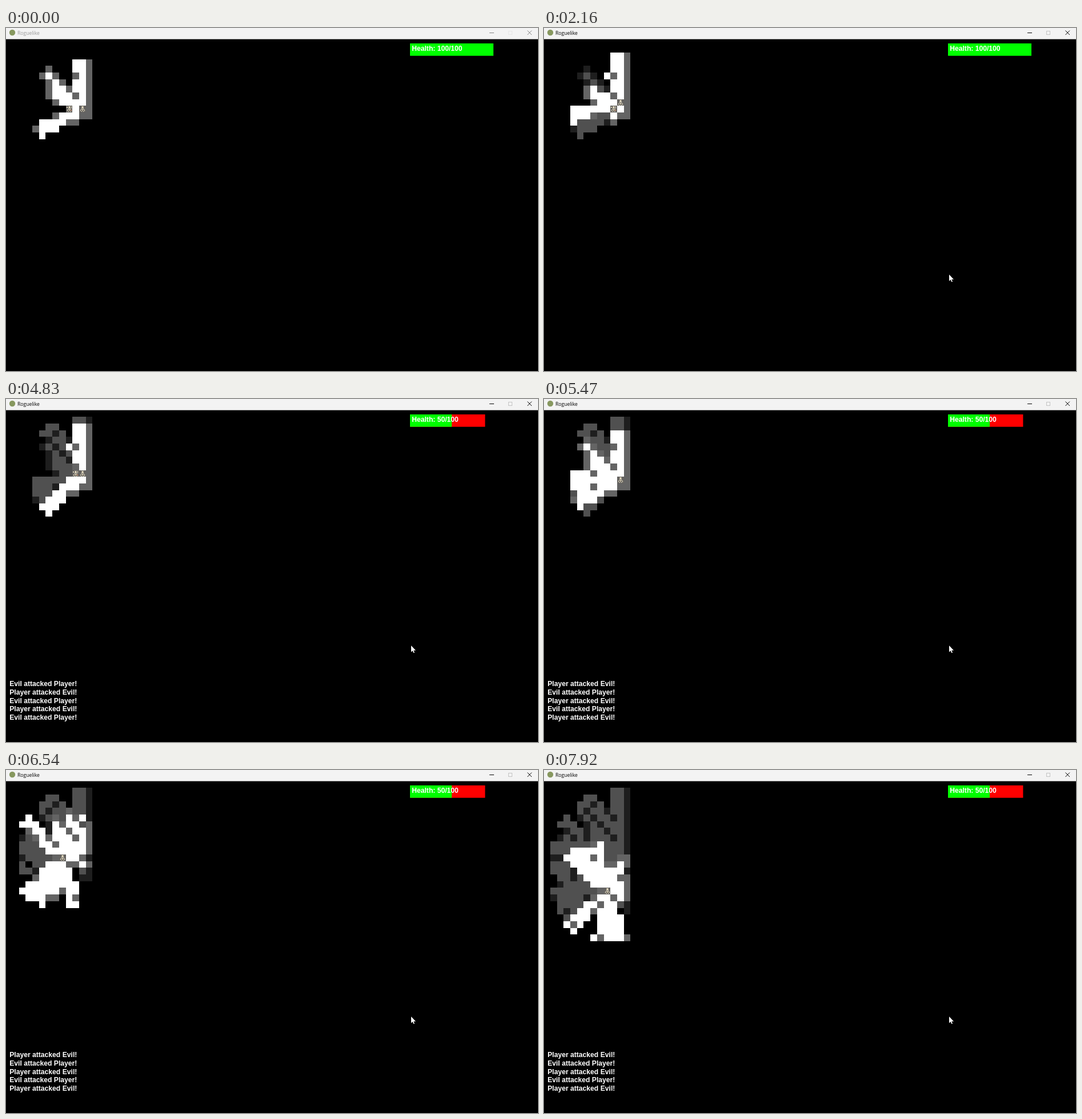
Animation, 931 px wide and 601 px high, one loop 8000 ms. Source, as an HTML page with a canvas:

```html
<!DOCTYPE html>
<html lang="en">
<head>
<meta charset="utf-8">
<title>Roguelike</title>
<style>
  html, body { margin: 0; width: 100%; height: 100%; overflow: hidden; background: #000; }
  canvas { display: block; width: 931px; height: 601px; }
</style>
</head>
<body>
<canvas id="stage" width="931" height="601"></canvas>
<script>
const ctx = document.getElementById('stage').getContext('2d');
const LOOP = 8000;
const RADIUS = 8;

// Dungeon rows: # wall, . floor
const MAP = [
  '',
  '          ..#',
  '      ..  ..#',
  '     ..#. ..#',
  '     .#..#..#',
  '   . #.#..#.#',
  '  ... #.#...#',
  '   #..#..#..#',
  '  #.#.#...#.#',
  ' ......#....#',
  ' ...........#',
  ' ##....#...##',
  ' ........##.#',
  ' ...#.......#',
  '  ..#......##',
  '  #.........#',
  ' .......#...#',
  ' #....##..#.#',
  '  ......#...#',
  '  .#...#... #',
  '   .... ....',
  '   .#.  ....',
  '    .   ....',
  '       .#...#',
];

// Each turn: start time, player cell, and whatever else changes
const TURNS = [
  { at: 0, player: [11, 10], evil: [9, 10], health: 100, log: '' },
  { at: 2160, player: [11, 9], evil: [10, 10] },
  { at: 2560, player: [11, 8], evil: [10, 9] },
  { at: 3330, player: [11, 9], health: 90, log: 'E' },
  { at: 3800, health: 80, log: 'EPE' },
  { at: 4230, health: 70, log: 'EPEPE' },
  { at: 4530, health: 60 },
  { at: 4830, health: 50 },
  { at: 5130, evil: null, log: 'PEPEP' },
  { at: 5470, player: [11, 10] },
  { at: 5670, player: [10, 10] },
  { at: 5970, player: [9, 10] },
  { at: 6180, player: [9, 11] },
  { at: 6540, player: [8, 11] },
  { at: 6750, player: [8, 12] },
  { at: 6980, player: [8, 13] },
  { at: 7250, player: [8, 14] },
  { at: 7450, player: [9, 14] },
  { at: 7720, player: [9, 15] },
  { at: 7920, player: [9, 16] },
];
const MESSAGES = { E: 'Evil attacked Player!', P: 'Player attacked Evil!' };

const tile = (x, y) => (MAP[y] || '')[x] || ' ';
const key = (x, y) => x + ',' + y;

// Recursive shadowcasting over eight octants
function fieldOfView([px, py], evil) {
  const lit = new Set([key(px, py)]);
  const blocks = (x, y) => tile(x, y) !== '.' || (evil && evil[0] === x && evil[1] === y);

  function cast(row, start, end, place) {
    if (start < end) return;
    let nextStart = start;
    for (let j = row; j <= RADIUS; j++) {
      let blocked = false;
      for (let dx = -j; dx <= 0; dx++) {
        const dy = -j;
        const left = (dx - 0.5) / (dy + 0.5);
        const right = (dx + 0.5) / (dy - 0.5);
        if (start < right) continue;
        if (end > left) break;
        const [x, y] = place(dx, dy);
        if (dx * dx + dy * dy < RADIUS * RADIUS) lit.add(key(x, y));
        const solid = blocks(x, y);
        if (blocked) {
          if (solid) { nextStart = right; continue; }
          blocked = false;
          start = nextStart;
        } else if (solid && j < RADIUS) {
          blocked = true;
          cast(j + 1, start, left, place);
          nextStart = right;
        }
      }
      if (blocked) break;
    }
  }

  for (const sx of [1, -1]) for (const sy of [1, -1]) {
    cast(1, 1, 0, (dx, dy) => [px + sx * dx, py + sy * dy]);
    cast(1, 1, 0, (dx, dy) => [px + sx * dy, py + sy * dx]);
  }
  return lit;
}

// Carry unchanged fields forward and accumulate the explored cells
let previous = { explored: new Set() };
const states = TURNS.map(turn => {
  const state = { ...previous, ...turn };
  state.lit = fieldOfView(state.player, state.evil);
  state.explored = new Set([...previous.explored, ...state.lit]);
  return previous = state;
});

const edgeX = c => Math.round(c * 11.68 - 0.6);
const edgeY = r => Math.round(r * 11.68 + 19.6);

function rect(color, x, y, w, h) {
  ctx.fillStyle = color;
  ctx.fillRect(x, y, w, h);
}

function text(str, x, y, font, color) {
  ctx.font = font;
  ctx.fillStyle = color;
  ctx.fillText(str, x, y);
}

function line(color, ...points) {
  ctx.strokeStyle = color;
  ctx.lineWidth = 1;
  ctx.beginPath();
  for (let i = 0; i < points.length; i += 4) {
    ctx.moveTo(points[i], points[i + 1]);
    ctx.lineTo(points[i + 2], points[i + 3]);
  }
  ctx.stroke();
}

function drawCells({ lit, explored }) {
  MAP.forEach((row, y) => [...row].forEach((kind, x) => {
    const k = key(x, y);
    if (kind === ' ' || !explored.has(k)) return;
    const wall = kind === '#';
    const color = lit.has(k) ? (wall ? '#646464' : '#fff') : (wall ? '#1e1e1e' : '#505050');
    rect(color, edgeX(x), edgeY(y), edgeX(x + 1) - edgeX(x), edgeY(y + 1) - edgeY(y));
  }));
}

function drawCreature([cx, cy], evil) {
  const x = edgeX(cx), y = edgeY(cy);
  const bone = '#ddd5bd', dark = '#45403a';
  rect('#656360', x, y, edgeX(cx + 1) - x, edgeY(cy + 1) - y);
  rect(bone, x + 4, y + 1, 4, 4);
  rect(dark, x + 4, y + 2, 1, 1);
  rect(dark, x + 7, y + 2, 1, 1);
  rect(bone, x + 3, y + 6, 6, 1);
  rect(bone, x + 2, y + 7, 1, 3);
  rect(bone, x + 9, y + 7, 1, 3);
  rect('#b9ae94', x + 5, y + 7, 2, 2);
  rect(bone, x + 4, y + 9, 1, 2);
  rect(bone, x + 7, y + 9, 1, 2);
  if (evil) {
    rect(bone, x + 1, y + 2, 2, 2);
    rect(bone, x + 9, y + 1, 1, 4);
    rect('#a86f58', x + 8, y + 7, 2, 2);
  }
}

function drawTitleBar(active) {
  const ink = active ? '#000' : '#858585';
  rect('#f3f3f3', 0, 0, 931, 19.6);
  ctx.fillStyle = '#87985f';
  ctx.beginPath();
  ctx.arc(11, 8, 5.2, 0, 7);
  ctx.fill();
  text('Roguelike', 20, 11.7, '8.6px "Open Sans", sans-serif', active ? '#000' : '#999');
  line(ink, 846, 8.5, 854, 8.5);
  ctx.strokeStyle = active ? '#c4c4c4' : '#e6e6e6';
  ctx.strokeRect(879.5, 5.5, 6, 6);
  line(ink, 912.5, 4.5, 920, 12, 920, 4.5, 912.5, 12);
}

function drawHud({ health, log }) {
  const bold = '12.15px "Liberation Sans", Arial, sans-serif';
  const width = 146;
  if (health < 90) rect('#f00', 707, 27, width * 0.9, 21.7);
  rect('#0f0', 707, 27, width * health / 100, 21.7);
  text(`Health: ${health}/100`, 710.2, 40.4, 'bold ' + bold, '#fff');
  [...log].forEach((who, i) => text(MESSAGES[who], 6.2, 503.3 + i * 14.65, 'bold ' + bold, '#fff'));
}

function drawPointer(t) {
  if (t < 90) return;
  const p = Math.min(1, (t - 90) / 490);
  const away = (1 - p) ** 2;
  ctx.save();
  ctx.translate(709 + 36 * away, 432 + 169 * away);
  ctx.fillStyle = '#fff';
  ctx.fill(new Path2D('M0 0V11.4L2.6 9L4.4 13L6 12.3L4.3 8.4H8Z'));
  ctx.restore();
}

function draw() {
  const t = performance.now() % LOOP;
  const state = states.filter(s => s.at <= t).pop();
  rect('#000', 0, 0, 931, 601);
  drawCells(state);
  if (state.evil && state.lit.has(key(...state.evil))) drawCreature(state.evil, true);
  drawCreature(state.player, false);
  drawHud(state);
  drawTitleBar(t >= 400);
  drawPointer(t);
  requestAnimationFrame(draw);
}
draw();
</script>
</body>
</html>
```
